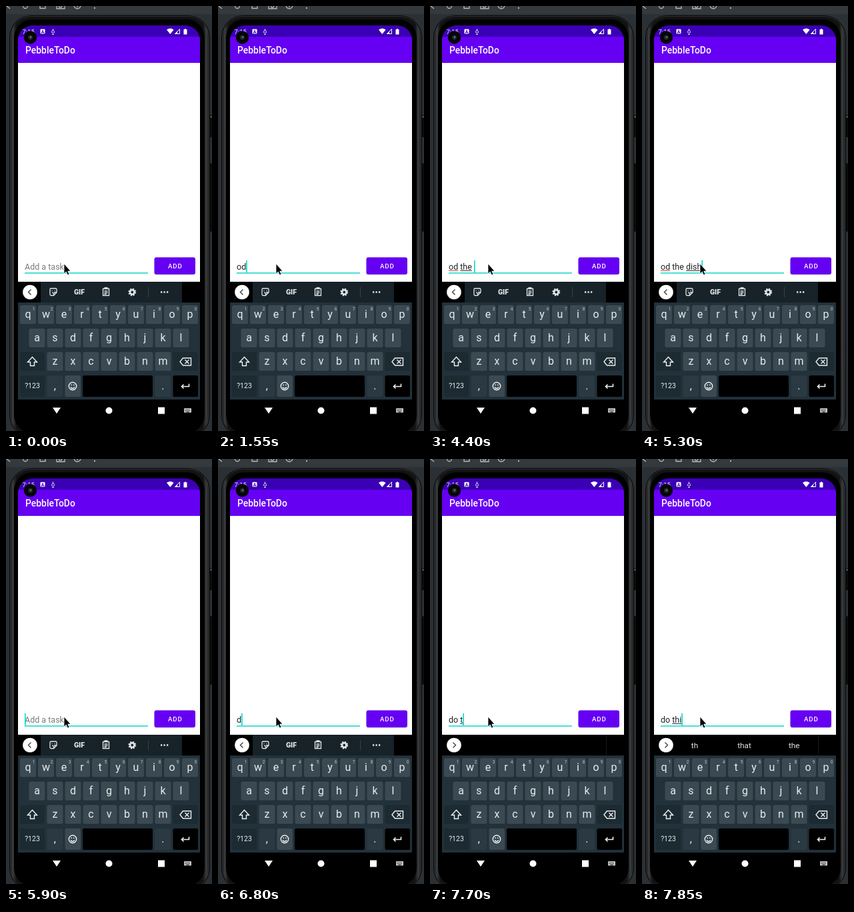
An HTML page that plays this animation: 309x635 px, repeating every 8000 ms.

```html
<!DOCTYPE html>
<html lang="en">
<head>
<meta charset="utf-8">
<title>To-do app</title>
<style>
  html, body { margin: 0; width: 100%; height: 100%; overflow: hidden; background: #2b3035; }
  svg { display: block; width: 309px; height: 635px; }
  text { font-family: Roboto, sans-serif; white-space: pre; }
</style>
</head>
<body>
<svg id="stage" viewBox="0 0 309 635">
  <defs>
    <clipPath id="screen"><rect x="18" y="29" width="273" height="620" rx="22"/></clipPath>
    <linearGradient id="rim">
      <stop offset="0" stop-color="#161718"/>
      <stop offset=".012" stop-color="#3b3d3f"/>
      <stop offset=".03" stop-color="#121212"/>
      <stop offset=".97" stop-color="#121212"/>
      <stop offset=".988" stop-color="#3b3d3f"/>
      <stop offset="1" stop-color="#161718"/>
    </linearGradient>
  </defs>

  <!-- emulator window and phone body -->
  <rect width="309" height="635" fill="#2b3035"/>
  <rect width="309" height="12" fill="#34393e"/>
  <g fill="none" stroke="#b4b8bb" stroke-width="1.3">
    <path d="M6 4 1 0"/>
    <circle cx="29" cy="0" r="3.5"/>
    <path d="M51 0V3.500H59V0M76 0V4H88V0"/>
    <circle cx="81.500" cy="0" r="2.200"/>
    <circle cx="107" cy="-1" r="5"/>
    <path d="M107-1V2"/>
    <path d="M132 3h2" stroke-width="2"/>
  </g>
  <path d="M306 163h3v33h-3zM306 235h3v102h-3z" fill="#0b0c0d"/>
  <path d="M307.500 164v3" stroke="#9a9da0"/>
  <rect x="5" y="14" width="301" height="630" rx="33" fill="#050505"/>
  <rect x="6.500" y="15.500" width="298" height="627" rx="31" fill="url(#rim)" stroke="#303234"/>
  <rect x="12" y="20" width="286" height="618" rx="27" fill="#000"/>

  <g clip-path="url(#screen)">
    <rect x="18" y="29" width="273" height="18" fill="#3b00b5"/>
    <rect x="18" y="46" width="273" height="39" fill="#6600f3"/>
    <rect x="18" y="85" width="273" height="327" fill="#fff"/>
    <rect x="18" y="443" width="273" height="145" fill="#22313a"/>
  </g>

  <!-- status bar -->
  <text x="24.500" y="41.500" font-size="9.500" fill="#e4dcf6">7:15</text>
  <rect x="51.500" y="34.500" width="7" height="7" rx="1" fill="#fff"/>
  <text x="55" y="40.500" font-size="7" font-weight="700" fill="#3b00b5" text-anchor="middle">A</text>
  <g fill="none" stroke="#e4dcf6">
    <circle cx="70.500" cy="38.700" r="2"/>
    <path d="M70.500 34v3M69 42.500h3"/>
  </g>
  <path d="M241 35.500Q246.300 31.500 251.600 35.500L246.300 42z" fill="#fff"/>
  <path d="M253.500 41.500H260.500V34.500z" fill="none" stroke="#fff"/>
  <path d="M257 38 253 42h4z" fill="#fff"/>
  <path d="M266.500 35h1.500v-1h2v1h1.500v7.500h-5z" fill="#fff"/>
  <circle cx="36.500" cy="47" r="9.700" fill="#050505"/>
  <circle cx="36.500" cy="47" r="3.500" fill="#25282b"/>
  <circle cx="37" cy="46.500" r="1.200" fill="#777b80"/>

  <text x="29" y="71.300" font-size="13.900" font-weight="500" fill="#fff">PebbleToDo</text>

  <!-- input row -->
  <path d="M28 399H213" stroke="#13d5c4" stroke-width="1.700"/>
  <g id="marks"></g>
  <text id="entry" x="28" y="394" font-size="12.500"></text>
  <rect id="caret" y="380" width="1.600" height="18" fill="#03dac5"/>
  <rect x="222.500" y="376" width="61.500" height="26" rx="3" fill="#000" opacity=".16"/>
  <rect x="222.500" y="375.500" width="61.500" height="25.500" rx="3" fill="#6600f3"/>
  <text x="243" y="392" font-size="9.700" font-weight="500" letter-spacing=".87" fill="#fff">ADD</text>
  <path d="M87 385V400L90.300 397 92.500 402 95 401 92.800 396.200H97z" fill="#000" stroke="#fff" stroke-width=".8"/>

  <!-- keyboard strip -->
  <rect x="18" y="412" width="273" height="31" fill="#000"/>
  <g id="tools" fill="none" stroke="#e3e7e9" stroke-width="1.300">
    <rect x="52" y="412" width="212" height="31" fill="#172229" stroke="none"/>
    <path d="M76 428V423.500Q76 422 74.500 422H67.500Q66 422 66 423.500V431Q66 432.500 67.500 432.500H71.500zH73Q71.500 428 71.500 432.500"/>
    <path d="M68.500 425.500h1M72.500 425.500h1M69 428.500h2"/>
    <text x="110" y="431" font-size="10.500" font-weight="900" text-anchor="middle" fill="#e3e7e9" stroke="none">GIF</text>
    <path d="M145.500 422.500h9v10h-9zM148 422.500v-1.500h4v1.500M147.500 426h5M147.500 428.500h5M147.500 430.500h3"/>
    <circle cx="189.300" cy="427.500" r="3.200" stroke-width="2.600"/>
    <circle cx="189.300" cy="427.500" r="5" stroke-width="1.800" stroke-dasharray="2.300 1.627"/>
    <path d="M213.500 420V435" stroke="#34424a" stroke-width="1"/>
    <path d="M232 427.500h2.300M236.500 427.500h2.300M241 427.500h2.300" stroke-width="2.300"/>
  </g>
  <g id="hints" fill="#dfe3e5" font-size="11.800" text-anchor="middle">
    <path d="M264.500 413V442" stroke="#141a1e"/>
  </g>
  <circle cx="36" cy="427.500" r="10.800" fill="#fff"/>
  <path id="chevron" fill="none" stroke="#37424a" stroke-width="1.400"/>

  <g id="keys" text-anchor="middle" fill="#e8ecee"></g>
  <g fill="none" stroke="#eef1f2" stroke-width="1.400">
    <path d="M39.500 524.500 32.500 532H36.500V537.500H42.500V532H46.500z"/>
    <path d="M265.500 526H277.500V537H265.500L261 531.500zM268.500 528.500l6 6M274.500 528.500l-6 6"/>
    <circle cx="100" cy="568" r="5.700"/>
    <path d="M97 569.500Q100 573.500 103 569.500M97.500 566.300h1.400M101.100 566.300h1.400"/>
    <path d="M274.500 564.500V568.500H263.500M266.500 565.500l-3 3 3 3" stroke-width="1.600"/>
  </g>

  <!-- navigation bar -->
  <path d="M70 600H82L76 609z" fill="#fff"/>
  <circle cx="154.500" cy="604.500" r="5" fill="#fff"/>
  <rect x="228" y="599.500" width="10" height="10" fill="#fff"/>
  <rect x="267" y="601" width="11" height="6.500" rx=".8" fill="#c9c9c9"/>
  <path d="M268.500 603h8M268.500 604.800h8" stroke="#000" stroke-dasharray="1 1"/>
  <path d="M270.500 606.500h4" stroke="#000" stroke-width=".8"/>
</svg>

<script>
const LOOP = 8000, LEFT = 28, HINT = "Add a task";
const $ = id => document.getElementById(id);
const make = (parent, tag, attrs, label) => {
  const el = document.createElementNS("http://www.w3.org/2000/svg", tag);
  for (const k in attrs) el.setAttribute(k, attrs[k]);
  if (label) el.textContent = label;
  return parent.appendChild(el);
};

function key(x, y, w, label, size = 16, fill = "#3b4a52", h = 28) {
  make($("keys"), "rect", { x, y, width: w, height: h, rx: 2.5, fill });
  if (label) make($("keys"), "text", { x: x + w / 2, y: y + h / 2 + size * .3, "font-size": size }, label);
}

function buildKeys() {
  const rows = [["qwertyuiop", 21], ["asdfghjkl", 34.5], ["zxcvbnm", 61.5]];
  rows.forEach(([letters, left], r) => [...letters].forEach((ch, i) => {
    const x = left + i * 27, y = 447 + r * 35;
    key(x, y, 24, ch);
    if (r === 0) make($("keys"), "text",
      { x: x + 20.5, y: y + 7.5, "font-size": 6.5, fill: "#b9c2c7" }, (i + 1) % 10 + "");
  }));
  const dark = "#1c2a32";
  key(21, 517, 37, "", 16, dark);
  key(250.5, 517, 37.5, "", 16, dark);
  key(21, 552, 37, "?123", 10.5, dark, 32);
  key(61.5, 552, 23.5, ",", 16, "#2b3a42", 32);
  key(88.5, 552, 23.5, "", 16, "#3b4a52", 32);
  key(115, 552, 105, "", 16, "#000", 32);
  key(223.5, 552, 23.5, ".", 16, "#2b3a42", 32);
  key(250.5, 552, 37.5, "", 16, "#000", 32);
}

// [start, text, caret shown, underlined ranges [from, to, misspelt], strip]
const typo = [0, 2, true];
const steps = [
  [0, "", false, []],
  [650, "o", true, []],
  [800, "o", false, []],
  [1550, "od", true, []],
  [1850, "od", true, [[0, 1]]],
  [3650, "od ", true, []],
  [3950, "od the", true, [[3, 4]]],
  [4400, "od the ", true, [typo, [3, 6]]],
  [4850, "od the di", true, [typo, [7, 8]]],
  [5000, "od the dis", true, [typo, [7, 8]]],
  [5150, "od the dish", true, [typo, [7, 8]]],
  [5300, "od the dish", true, [typo, [7, 11]]],
  [5600, "od the ", true, [typo]],
  [5750, "od t", true, [typo]],
  [5900, "", true, []],
  [6500, "", false, []],
  [6800, "d", true, []],
  [6950, "do", true, [[0, 1]]],
  [7400, "do", false, [[0, 1]]],
  [7700, "do t", true, [[3, 4]], "empty"],
  [7850, "do thi", true, [[3, 6]], "words"]
];

const pen = document.createElement("canvas").getContext("2d");
pen.font = "12.5px Roboto, sans-serif";
const edge = str => LEFT + pen.measureText(str).width;

const words = ["th", "that", "the"].map((word, i) =>
  make($("hints"), "text", { x: 79 + i * 74.6, y: 432 }, word));

let shown;
function draw(time) {
  const step = steps.findLast(s => s[0] <= time);
  if (step === shown) return;
  shown = step;
  const [, str, caret, lines, strip] = step;
  $("entry").textContent = str || HINT;
  $("entry").setAttribute("fill", str ? "#212121" : "#7b7b7b");
  $("caret").setAttribute("x", edge(str));
  $("caret").style.display = caret ? "" : "none";
  $("marks").replaceChildren();
  for (const [from, to, wrong] of lines) {
    const x = edge(str.slice(0, from));
    make($("marks"), "rect", {
      x, y: 395, width: edge(str.slice(0, to)) - x, height: 1,
      fill: wrong ? "#c0504d" : "#333"
    });
  }
  $("tools").style.display = strip ? "none" : "";
  $("hints").style.display = strip ? "" : "none";
  words.forEach(w => w.style.display = strip === "words" ? "" : "none");
  $("chevron").setAttribute("d", strip ? "M34.500 423.500l4 4-4 4" : "M37.500 423.500l-4 4 4 4");
}

buildKeys();
const start = performance.now();
function tick() {
  draw((performance.now() - start) % LOOP);
  requestAnimationFrame(tick);
}
tick();
</script>
</body>
</html>
```
